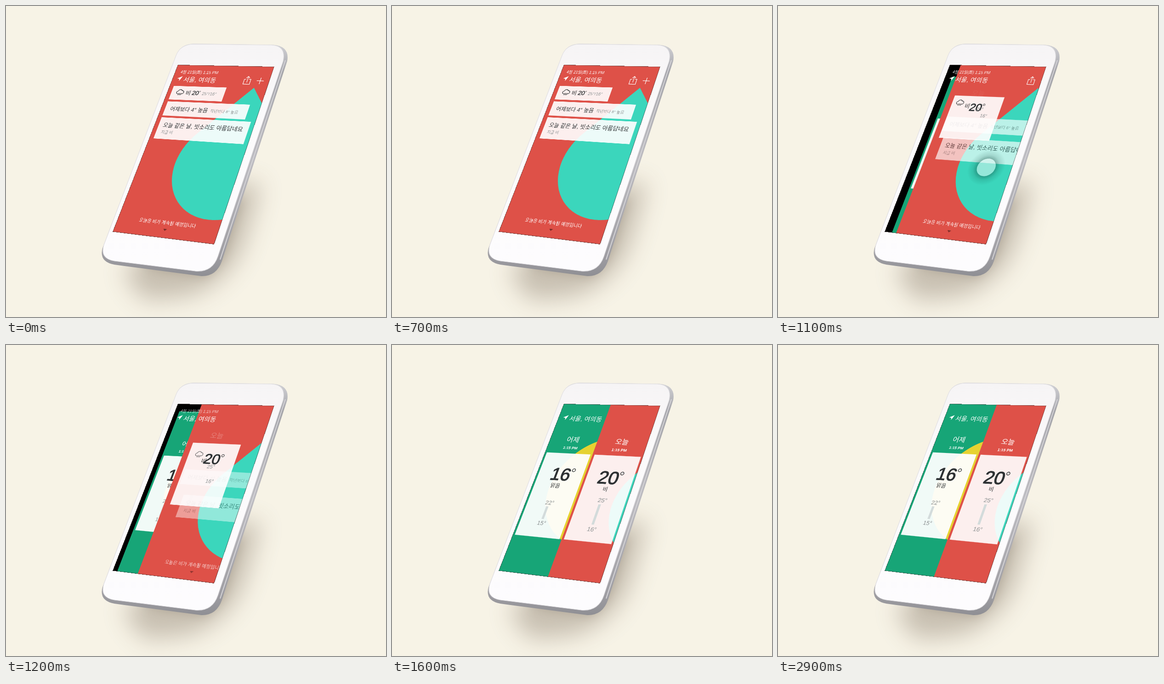
Recreate the animation shown at these times as an HTML page. Size 827 by 677 pixels, loop 3 s.

```html
<!DOCTYPE html>
<html lang="ko">
<head>
<meta charset="utf-8">
<style>
  html, body { margin: 0; width: 100%; height: 100%; overflow: hidden; background: #f7f3e6; }
  svg { position: absolute; left: 0; top: 0; display: block; }
  #screen {
    width: 375px; height: 667px; overflow: hidden; background: #000; transform-origin: 0 0;
    transform: matrix3d(.47453, -.008651, 0, -.00014635, -.24151, .48433, 0, -.00012339, 0, 0, 1, 0, 374, 128, 0, 1);
    font-family: "Liberation Sans", "Noto Sans CJK KR", "Noto Sans CJK", sans-serif;
  }
</style>
</head>
<body>
<svg width="827" height="677" viewBox="0 0 827 677">
  <defs>
    <filter id="soft" x="-40%" y="-40%" width="180%" height="180%"><feGaussianBlur stdDeviation="26"/></filter>
    <filter id="near" x="-40%" y="-40%" width="180%" height="180%"><feGaussianBlur stdDeviation="11"/></filter>
    <linearGradient id="side" x1="0" y1="0" x2="0" y2="1">
      <stop offset="0" stop-color="#d2d2d6"/><stop offset=".12" stop-color="#a5a5aa"/>
      <stop offset=".5" stop-color="#bdbcc1"/><stop offset=".9" stop-color="#a09fa4"/><stop offset="1" stop-color="#8f8f94"/>
    </linearGradient>
    <linearGradient id="face" x1="0" y1="0" x2="0" y2="1">
      <stop offset="0" stop-color="#f6f4f5"/><stop offset=".3" stop-color="#fbfafb"/><stop offset="1" stop-color="#fdfcfe"/>
    </linearGradient>
  </defs>
  <path d="M255 580 L300 640 L395 632 Q490 600 520 510 L555 385 L470 390 Z" fill="#8d8070" opacity=".45" filter="url(#soft)"/>
  <path d="M300 570 L430 590 Q470 570 484 520 L515 420 L440 430 Z" fill="#85796b" opacity=".32" filter="url(#near)"/>
  <path d="M408 82 L582 84.5 Q618 88 612 120 L470 555 Q458 589 425 588 L236 563 Q202 557 210 527 L370 108 Q379 83 408 82Z" fill="url(#side)"/>
  <path d="M608 118 L466 552" fill="none" stroke="#d5d4d8" stroke-width="2"/>
  <path d="M408 83 L578 85 Q610 87 603 120 L461 545 Q449 580 412 577 L236 555 Q204 550 213 520 L370 108 Q379 84 408 83Z" fill="url(#face)" stroke="#e2e0e3" stroke-width="1.2"/>
</svg>
<svg id="screen" viewBox="0 0 375 667"></svg>
<script>
const LOOP = 3000, STEP = 100;
const screenEl = document.getElementById('screen');
const DARK = '#2e3234', GREY = '#8b9091';

const clamp = v => Math.min(1, Math.max(0, v));
const lerp = (a, b, k) => a + (b - a) * k;
const ease = (t, start, length, a, b) => 1 - (1 - clamp((t - start) / length) ** a) ** b;

const group = (x, y, opacity, body) =>
  opacity > 0 ? `<g transform="translate(${x} ${y})" opacity="${opacity}">${body}</g>` : '';
const text = (x, y, size, str, fill = '#fff', weight = 400, anchor = 'start', opacity = 1) =>
  `<text x="${x}" y="${y}" font-size="${size}" fill="${fill}" font-weight="${weight}" text-anchor="${anchor}" opacity="${opacity}">${str}</text>`;
const centred = (x, y, size, str, fill, weight, opacity) => text(x, y, size, str, fill, weight, 'middle', opacity);
const rect = (x, y, w, h, fill, opacity = 1) =>
  `<rect x="${x}" y="${y}" width="${w}" height="${h}" fill="${fill}" opacity="${opacity}"/>`;
const whiteCard = (x, y, w, h) => rect(x, y, w, h, '#fff', .91);

// Large temperature with a ring as degree sign
const degrees = (x, y, size, n) =>
  `<text x="${x}" y="${y}" font-size="${size}" fill="${DARK}" stroke="${DARK}" stroke-width="${size * .03}">${n}</text>
  <circle cx="${x + size * 1.21}" cy="${y - size * .62}" r="${size * .085}" fill="none" stroke="${DARK}" stroke-width="${size * .035}"/>`;

const cloud = `<g fill="none" stroke="${DARK}" stroke-width="2.2" stroke-linecap="round">
  <path d="M-8 6a5.5 5.5 0 0 1-1-11a8 8 0 0 1 15-2a6.5 6.5 0 0 1 3 13"/><path d="M-3 4l-3 7M2 4l-3 7M7 4l-3 7"/></g>`;

const place = `<path d="M38 48L19 58L28 60L30 69Z" fill="#fff"/>` + text(46, 71, 25, '서울, 여의동', '#fff', 500);

function yesterday(p) {
  const s = lerp(.8, 1, p);
  return `<g transform="translate(187.5 333.5) scale(${s}) translate(-187.5 -333.5)">`
    + rect(0, 0, 375, 800, '#17a577')
    + `<circle cx="282" cy="343" r="212" fill="#e6d231"/>`
    + centred(92, 159, 27, '어제', '#fff', 500)
    + centred(93, 188, 15, '1:15 PM', '#fff', 700)
    + rect(8, 205.5, 172, 326, '#fff', .94)
    + degrees(57, 313, 68, 16)
    + centred(90, 342, 20, '맑음', DARK, 500)
    + centred(94, 409, 22, '22°', GREY)
    + rect(85.5, 416, 9, 48, '#d3dbdb')
    + centred(92, 487, 22, '15°', GREY) + '</g>';
}

function todayCard(p, r) {
  const m = (p + r) / 2, late = p * p;
  const w = lerp(208, 172, r), cx = lerp(121, 94, late);
  const minor = lerp(17, 22, p);
  return whiteCard(cx - w / 2, lerp(90, 205.5, m), w, lerp(57, 326, r))
    + group(lerp(52, 92, late), lerp(116, 290, p), clamp(1 - 1.25 * late), cloud)
    + rect(87.5, 393 - 90 * (1 - p), 9, 75, '#d3dbdb', clamp(p * 2 - 1))
    + degrees(lerp(100, 52, late), lerp(125, 315, m), lerp(24, 68, r), 20)
    + centred(lerp(85, 92.5, p), lerp(125, 343, p), lerp(22, 20, p), '비', DARK, 500)
    + centred(lerp(152, 97, p), lerp(124, 385, p), minor, '25°', GREY)
    + centred(lerp(167, 97, p), lerp(124, 430, p), 17, '/', GREY, 400, clamp(1 - p * 4))
    + centred(lerp(183, 95, p), lerp(124, 493, p), minor, '16°', GREY);
}

function today(p, q, r) {
  const late = p * p, fade = 1 - late;
  return rect(0, 0, 375, 667, '#de5148')
    + `<path d="M327 87.5L177 277.6A191 191 0 1 0 477 277.6Z" fill="#3bd6bc"/>`
    + group(0, 0, fade, `<g fill="none" stroke="#fff" stroke-width="2">
        <path d="M288 54h-7v20h24v-20h-7M293 67v-24M286.5 49l6.5-7l6.5 7M328 59h26M341 46v26"/></g>`)
    + group(0, 0, fade, centred(187, 619, 16.4, '오늘은 비가 계속될 예정입니다', '#fff', 500)
        + '<path d="M181 635h14l-7 7z" fill="#7a2c28"/>')
    + group(25 * q, 217 * q, 1 - q, whiteCard(17, 155, 317, 58.5)
        + text(38, 192, 21, '어제보다 4° 높음', DARK, 500)
        + text(195, 192, 15, '작년보다 6° 높음', GREY))
    + group(84 * q, 278 * q, 1 - q, whiteCard(17, 221, 341.5, 86)
        + text(35, 259, 21.3, '오늘 같은 날, 빗소리도 아름답네요', DARK, 500)
        + text(37, 285, 15.3, '지금 비', GREY))
    + centred(lerp(116, 93, p), lerp(115, 160, p), 27, '오늘', '#fff', 500, late)
    + centred(lerp(116, 93, p), lerp(143, 188, p), 15, '1:15 PM', '#fff', 700, clamp(p * 3 - 2))
    + todayCard(p, r);
}

function touch(t, shift) {
  const opacity = Math.min(clamp((t - 800) / 150), clamp((1180 - t) / 150));
  return group(239 + shift, 400, opacity,
    '<circle r="66" fill="url(#glow)"/><circle r="33" fill="#e4f6f3"/>');
}

function draw(t) {
  const p = ease(t, 990, 600, 1.4, 2.785);
  const q = ease(t, 950, 600, 1.4, 2.1);
  const r = ease(t, 1000, 800, 1, 4.2);
  const shift = 187.5 * p;
  screenEl.innerHTML = `<defs><radialGradient id="glow">
      <stop offset=".45" stop-color="#06372d" stop-opacity=".75"/><stop offset=".7" stop-color="#06372d" stop-opacity=".25"/>
      <stop offset="1" stop-color="#06372d" stop-opacity="0"/></radialGradient></defs>`
    + yesterday(p)
    + group(shift, 0, 1, today(p, q, r))
    + touch(t, shift)
    + text(23, 36, 16, '4월 21일(화) 1:15 PM', '#fff', 400, 'start', 1 - p * p)
    + place
    + '<rect width="375" height="667" fill="none" stroke="#4a4444" stroke-width="3" opacity=".7"/>';
}

let shown = -1;
function tick(now) {
  const t = Math.floor(now % LOOP / STEP) * STEP;
  if (t !== shown) draw(shown = t);
  requestAnimationFrame(tick);
}
tick(performance.now());
</script>
</body>
</html>
```
